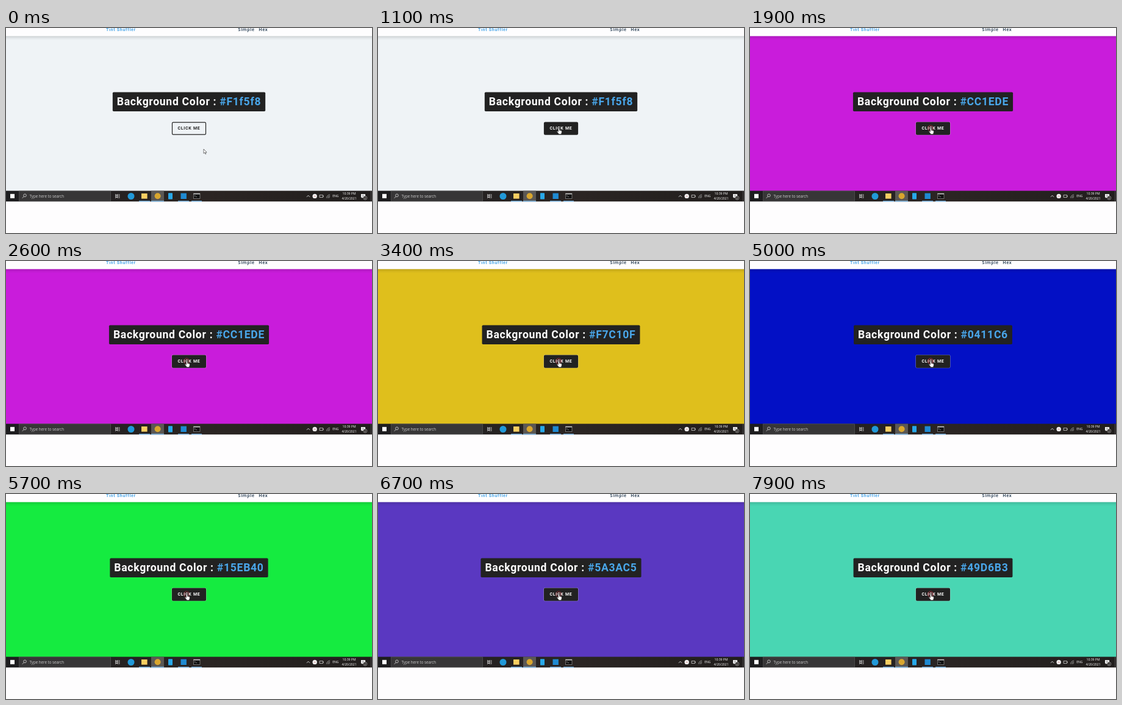
Recreate the animation shown at these times as an HTML page. Size 600 by 337 pixels, loop 8000 ms.

```html
<!DOCTYPE html>
<html lang="en">
<head>
<meta charset="utf-8">
<title>Background colors</title>
<style>
  html, body { margin: 0; width: 100%; height: 100%; overflow: hidden; background: #fff; }
  svg { display: block; width: 100%; height: 100%; }
  text { white-space: pre; }
  .page { font: 700 7.03px Roboto, sans-serif; letter-spacing: .703px; }
  .page .link { font: 600 7.03px "Open Sans", sans-serif; fill: #102a42; }
  .page .title { font-size: 17.57px; fill: #fff; }
  .bar { font-family: "Open Sans", sans-serif; font-size: 5.1px; fill: #fff; }
  .bar .search { font-size: 6.2px; fill: #ccc; }
  .bar .badge { font-size: 4.2px; }
</style>
</head>
<body>
<svg viewBox="0 0 600 337" preserveAspectRatio="none">
  <defs>
    <linearGradient id="shade" x2="0" y2="1">
      <stop offset="0" stop-opacity=".15"/>
      <stop offset=".45" stop-opacity=".06"/>
      <stop offset="1" stop-opacity="0"/>
    </linearGradient>
    <linearGradient id="barFill">
      <stop offset="0" stop-color="#1d1d1f"/>
      <stop offset=".55" stop-color="#2b2523"/>
      <stop offset="1" stop-color="#211e1d"/>
    </linearGradient>
  </defs>

  <rect width="600" height="337" fill="#fefdfe"/>
  <rect id="backdrop" y="13.4" width="600" height="254.6"/>
  <rect y="13.4" width="600" height="6.6" fill="url(#shade)"/>

  <g class="page">
    <text x="164" y="4.8" fill="#49a6e9">Tint Shuffler</text>
    <text class="link" x="380.6" y="5.1">Simple</text>
    <text class="link" x="414.2" y="5.1">Hex</text>
    <rect id="panel" y="105.4" height="31.6" rx="1.8" fill="#222"/>
    <text id="title" class="title" y="127.2">Background Color : <tspan id="code" fill="#49a6e9"></tspan></text>
    <rect id="focus" x="271.8" y="154.5" width="56.4" height="21.2" rx="2" fill="none" stroke="#fff" stroke-width=".8" opacity=".5"/>
    <rect id="button" x="272.5" y="155.1" width="55" height="20" rx="1.6" stroke="#222" stroke-width="1.2"/>
    <text id="label" x="281.5" y="167.3">CLICK ME</text>
  </g>

  <g class="bar">
    <rect y="267.6" width="600" height="17.6" fill="url(#barFill)"/>
    <rect x="21.7" y="267.9" width="150" height="17" fill="#373637" stroke="#666" stroke-width=".5"/>
    <rect x="7" y="272.8" width="7" height="7" fill="#fff"/>
    <g fill="none" stroke="#ddd" stroke-width=".8">
      <circle cx="31" cy="275.2" r="2.3"/>
      <path d="M29.3 277l-2.6 2.8"/>
    </g>
    <text class="search" x="38.5" y="278.6">Type here to search</text>

    <path d="M179.5 273v1.2h4v-1.2M179.5 279.8v-1.2h4v1.2M179.5 275.3h4v2h-4zM185.8 273v7"
      fill="none" stroke="#ddd" stroke-width=".8"/>
    <rect x="238" y="267.6" width="21" height="17.6" fill="#5b5855"/>
    <circle cx="205" cy="276.5" r="5.5" fill="#2199d8"/>
    <rect x="222" y="272" width="9.6" height="8.6" fill="#f7ce62"/>
    <circle cx="248.6" cy="276.3" r="5" fill="#d9a62e"/>
    <rect x="266" y="271.2" width="7" height="10.4" rx=".8" fill="#28a8e8"/>
    <rect x="286.5" y="271.6" width="9.4" height="9.4" fill="#1f8ad2"/>
    <rect x="307.6" y="272" width="10.4" height="8.4" fill="#111" stroke="#aaa" stroke-width=".6"/>
    <path d="M307.6 272.7h10.4" stroke="#ccc" stroke-width="1.4"/>
    <path d="M309 275l1.3 1-1.3 1M311 277.4h2" fill="none" stroke="#ddd" stroke-width=".5"/>
    <path d="M218 284.6h18M238 284.6h21M282 284.6h18M304 284.6h17" stroke="#76b9ed" stroke-width="1.2"/>

    <g fill="none" stroke="#eee" stroke-width=".9">
      <path d="M493 277.7l2.5-2.5 2.5 2.5"/>
      <path d="M514 274.6h5.6v3.8h-5.6zM520.4 275.7v1.6" stroke-width=".7"/>
      <path d="M525.5 279.6a5.6 5.6 0 0 1 5.6-5.6M527.5 279.6a3.6 3.6 0 0 1 3.6-3.6M529.3 279.6a1.8 1.8 0 0 1 1.8-1.8" stroke="#bbb" stroke-width=".7"/>
    </g>
    <circle cx="506.2" cy="276.4" r="3.7" fill="#f2f2f2"/>
    <path d="M504.6 276.4h3.2" stroke="#c77" stroke-width=".8"/>
    <text x="535.2" y="278.2">ENG</text>
    <text x="562.5" y="274" text-anchor="middle">10:39 PM</text>
    <text x="562.5" y="281.8" text-anchor="middle">4/20/2021</text>
    <path d="M582 273h7v5.4h-4l-1.4 1.5v-1.5h-1.6z"/>
    <path d="M583.3 274.8h4.4M583.3 276.5h4.4" stroke="#333" stroke-width=".5"/>
    <circle cx="588.8" cy="279.3" r="3" fill="#2b2725" stroke="#ddd" stroke-width=".5"/>
    <text class="badge" x="588.8" y="280.9" text-anchor="middle">2</text>
    <path d="M598.2 268v17" stroke="#777" stroke-width=".5"/>
  </g>

  <circle id="ring" cx="296" cy="164.6" r="4.6" fill="#d02030" fill-opacity=".22" stroke="#d83a48" stroke-width=".8"/>
  <path id="arrow" d="M0 0V7.2L1.7 5.7 2.9 8.3 4 7.8 2.9 5.3H5.1Z" fill="#fff" stroke="#222" stroke-width=".6"/>
  <path id="hand" d="M-.9 .7Q0-.5 .9 .7V4Q1.7 3.4 2.3 4.2 3.1 3.7 3.6 4.6 4.6 4.2 4.8 5.2V7.5Q4.6 8.6 4 9.3V10.4H-.3V9.5L-3 6.3Q-2.8 4.9-1.7 5.7L-.9 6.4Z"
    fill="#fff" stroke="#222" stroke-width=".5"/>
</svg>
<script>
const LOOP = 8000;
const MOVE_START = 100, MOVE_END = 900;
const scenes = [
  { at: 0, code: "#F1f5f8", fill: "#eff3f6" },
  { at: 1200, code: "#CC1EDE", fill: "#c91cdb" },
  { at: 2700, code: "#F7C10F", fill: "#dfbf1c" },
  { at: 3900, code: "#0411C6", fill: "#0310c5" },
  { at: 5100, code: "#15EB40", fill: "#15eb40" },
  { at: 6200, code: "#5A3AC5", fill: "#5a38c1" },
  { at: 7300, code: "#49D6B3", fill: "#49d6b3" }
];

const $ = id => document.getElementById(id);
const set = (id, attrs) => {
  for (const name in attrs) $(id).setAttribute(name, attrs[name]);
};
const show = (id, visible) => set(id, { visibility: visible ? "visible" : "hidden" });
const lerp = (a, b, k) => a + (b - a) * k;
const ease = k => k * k * (3 - 2 * k);

function drawScene(t) {
  const scene = scenes.filter(s => s.at <= t).pop();
  set("backdrop", { fill: scene.fill });
  if ($("code").textContent !== scene.code) $("code").textContent = scene.code;
  const width = $("title").getComputedTextLength();
  set("title", { x: 300 - width / 2 });
  set("panel", { x: 293 - width / 2, width: width + 14 });
}

function drawPointer(t) {
  const k = ease(Math.min(1, Math.max(0, (t - MOVE_START) / (MOVE_END - MOVE_START))));
  const x = lerp(324, 296.4, k), y = lerp(199, 164.2, k);
  const hover = y < 175.5;
  const clicked = t >= scenes[1].at;
  const place = { transform: `translate(${x} ${y})` };
  set("arrow", place);
  set("hand", place);
  show("arrow", !hover);
  show("hand", hover);
  set("button", { fill: hover ? "#222" : "none" });
  set("label", { fill: hover ? "#fff" : "#222" });
  show("focus", clicked);
  show("ring", clicked);
  set("ring", { opacity: .65 + .15 * Math.cos(t / 500 * 2 * Math.PI) });
}

function frame(now) {
  const t = now % LOOP;
  drawScene(t);
  drawPointer(t);
  requestAnimationFrame(frame);
}
frame(0);
</script>
</body>
</html>
```
